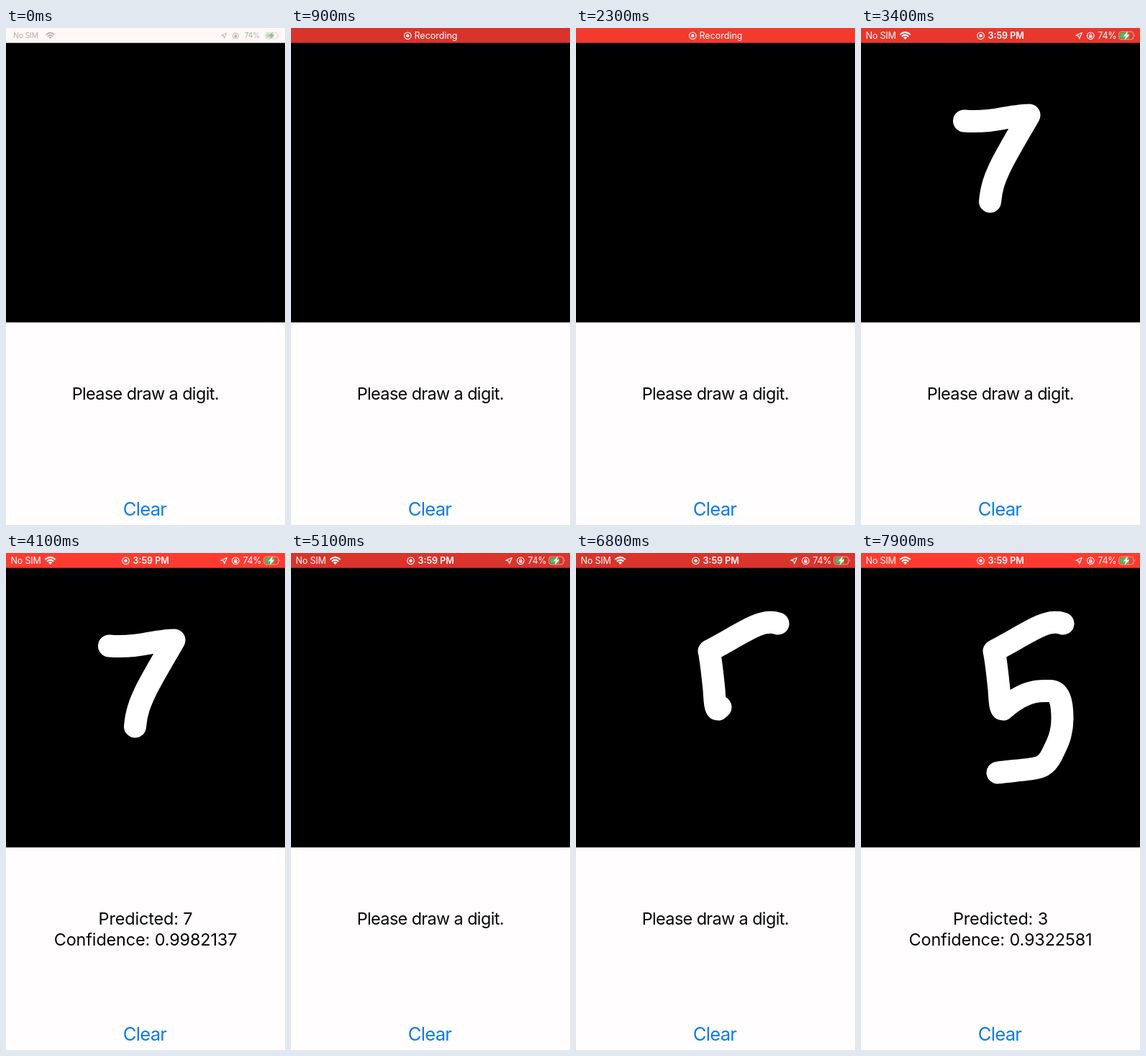
Write an HTML page that moves like this. It is 388x690 px and loops after 8 s.

```html
<!DOCTYPE html>
<html lang="en">
<head>
<meta charset="utf-8">
<title>Digit drawing</title>
<style>
  html, body { margin: 0; width: 100%; height: 100%; overflow: hidden; background: #fffdfd; }
  svg { display: block; width: 388px; height: 690px; font-family: Inter, Roboto, sans-serif; }
  text { white-space: pre; }
  .small { font-size: 12.5px; fill: currentColor; }
  .label { font-size: 23.4px; text-anchor: middle; fill: #050505; }
  .prompt { letter-spacing: -.6px; }
  .result { letter-spacing: -.12px; }
  .clear { font-size: 25.6px; letter-spacing: -.75px; text-anchor: middle; fill: #0b7bee; }
  .item { transform-box: fill-box; transform-origin: center; }
  .line { fill: none; stroke: currentColor; }
  .ink { fill: none; stroke: #fff; stroke-width: 31; stroke-linecap: round; stroke-linejoin: round; }
  .white { color: #fff; }
</style>
</head>
<body>
<svg viewBox="0 0 388 690">
  <defs>
    <g id="dot">
      <circle class="line" r="4.8" stroke-width="1.1"/>
      <circle r="2.2" fill="currentColor"/>
    </g>
  </defs>

  <rect id="bar" width="388" height="21"/>

  <g id="recording" class="white">
    <use href="#dot" x="162.3" y="10.8"/>
    <text class="small" x="171.5" y="15.2">Recording</text>
  </g>

  <g id="clock" class="white">
    <use href="#dot" x="166.5" y="10.8"/>
    <text class="small" x="176.5" y="15.2" font-weight="600">3:59 PM</text>
  </g>

  <g id="status">
    <text class="item small" x="6.5" y="15.2" letter-spacing="-.15">No SIM</text>
    <g class="item">
      <path class="line" stroke-width="2.1" d="M54.3 9 Q61.5 2.6 68.7 9 M56.8 11.7 Q61.5 7.6 66.2 11.7"/>
      <path fill="currentColor" d="M61.5 16 L58.8 13.2 Q61.5 11 64.2 13.2 Z"/>
    </g>
    <path class="item line" stroke-width="1.1" stroke-linejoin="round" d="M307.3 6.5 L303.6 15 L302.8 11.1 L298.8 10.3 Z"/>
    <g class="item">
      <circle class="line" cx="319.3" cy="10.8" r="4.8" stroke-width="1.1"/>
      <rect x="317.1" y="10.2" width="4.4" height="3.2" rx=".5" fill="currentColor"/>
      <path class="line" stroke-width=".9" d="M318 10.4 V9.4 A1.3 1.3 0 0 1 320.6 9.4 V10.4"/>
    </g>
    <text class="item small" x="329.3" y="15.2" letter-spacing="-.2">74%</text>
    <g class="item">
      <rect class="line" x="358.8" y="5.2" width="20" height="10.6" rx="2.9" stroke-width="1" opacity=".55"/>
      <path fill="currentColor" opacity=".6" d="M380 8.8 Q382 10.5 380 12.2 Z"/>
      <rect id="charge" x="360.3" y="6.7" width="12.6" height="7.6" rx="1.5" fill="#35c759"/>
      <path fill="currentColor" d="M371.2 4.2 L364.6 11.4 H368.2 L366.6 16.8 L373.4 9.4 H369.6 Z"/>
    </g>
  </g>

  <rect y="20.7" width="388" height="388"/>
  <path id="seven" class="ink" pathLength="100" d="M143.5 129 C165 131 185 128 200 125 C212 123 225 121 234 121 C222 142 208 165 196 188 C186 208 181 222 179.5 241"/>
  <path id="five" class="ink" pathLength="100" d="M281 98 C272 95 262 96 250 101 C232 109 210 123 185 136 C188 150 190 170 192 190 C193 203 193 217 197.5 217 C210 206 228 194 246 192 C252 191 256 191.5 262 191.5 C276 191.5 280 206 280 230 C280 255 270 270 265 281 C256 298 247 298 235 300 C220 302 205 303 190 305"/>

  <text id="prompt" class="label prompt" x="193.8" y="515.5">Please draw a digit.</text>
  <g id="result" class="label result">
    <text id="digit" x="194" y="515.5"></text>
    <text id="confidence" x="194" y="544.8"></text>
  </g>
  <text class="clear" x="193" y="677.3">Clear</text>
</svg>
<script>
const LOOP = 8000;
const el = id => document.getElementById(id);
const items = document.querySelectorAll('.item');

const ramp = (t, from, to) => Math.min(1, Math.max(0, (t - from) / (to - from)));
const mix = (a, b, k) => a.map((v, i) => v + (b[i] - v) * k);
const rgb = c => `rgb(${c.map(Math.round).join(',')})`;
const show = (node, on) => node.style.visibility = on ? 'visible' : 'hidden';

const PAPER = [255, 248, 246], DARK = [216, 52, 44], BRIGHT = [255, 59, 48];

const strokes = [
  { id: 'seven', start: 2500, end: 3350, cleared: 4800 },
  { id: 'five', start: 6300, end: 7450, cleared: LOOP }
];

const results = [
  { from: 3500, to: 4800, digit: 7, confidence: '0.9982137' },
  { from: 7500, to: LOOP, digit: 3, confidence: '0.9322581' }
];

function drawBar(t) {
  const pulse = (1 - Math.cos((t - 950) / 2000 * 2 * Math.PI)) / 2;
  el('bar').setAttribute('fill', rgb(mix(PAPER, mix(DARK, BRIGHT, pulse), ramp(t, 50, 450))));

  const back = ramp(t, 3000, 3200);
  const leaving = t < 1000;
  el('recording').style.opacity = ramp(t, 200, 500) * (1 - back);
  el('clock').style.opacity = back;
  el('status').style.opacity = leaving ? 1 - ramp(t, 0, 200) : back;
  el('status').style.color = leaving ? '#b0abab' : '#fff';
  el('charge').style.opacity = leaving ? .4 : 1;
  const scale = leaving ? .82 - .2 * ramp(t, 0, 200) : .7 + .3 * back;
  items.forEach(item => item.style.transform = `scale(${scale})`);
}

function drawInk(t) {
  for (const { id, start, end, cleared } of strokes) {
    const path = el(id);
    show(path, t >= start && t < cleared);
    path.style.strokeDasharray = `${100 * ramp(t, start, end) + .01} 200`;
  }
}

function drawLabel(t) {
  const result = results.find(r => t >= r.from && t < r.to);
  show(el('prompt'), !result);
  show(el('result'), result);
  if (!result) return;
  el('digit').textContent = `Predicted: ${result.digit}`;
  el('confidence').textContent = `Confidence: ${result.confidence}`;
}

const began = performance.now();
function frame() {
  const t = (performance.now() - began) % LOOP;
  drawBar(t);
  drawInk(t);
  drawLabel(t);
  requestAnimationFrame(frame);
}
frame();
</script>
</body>
</html>
```
